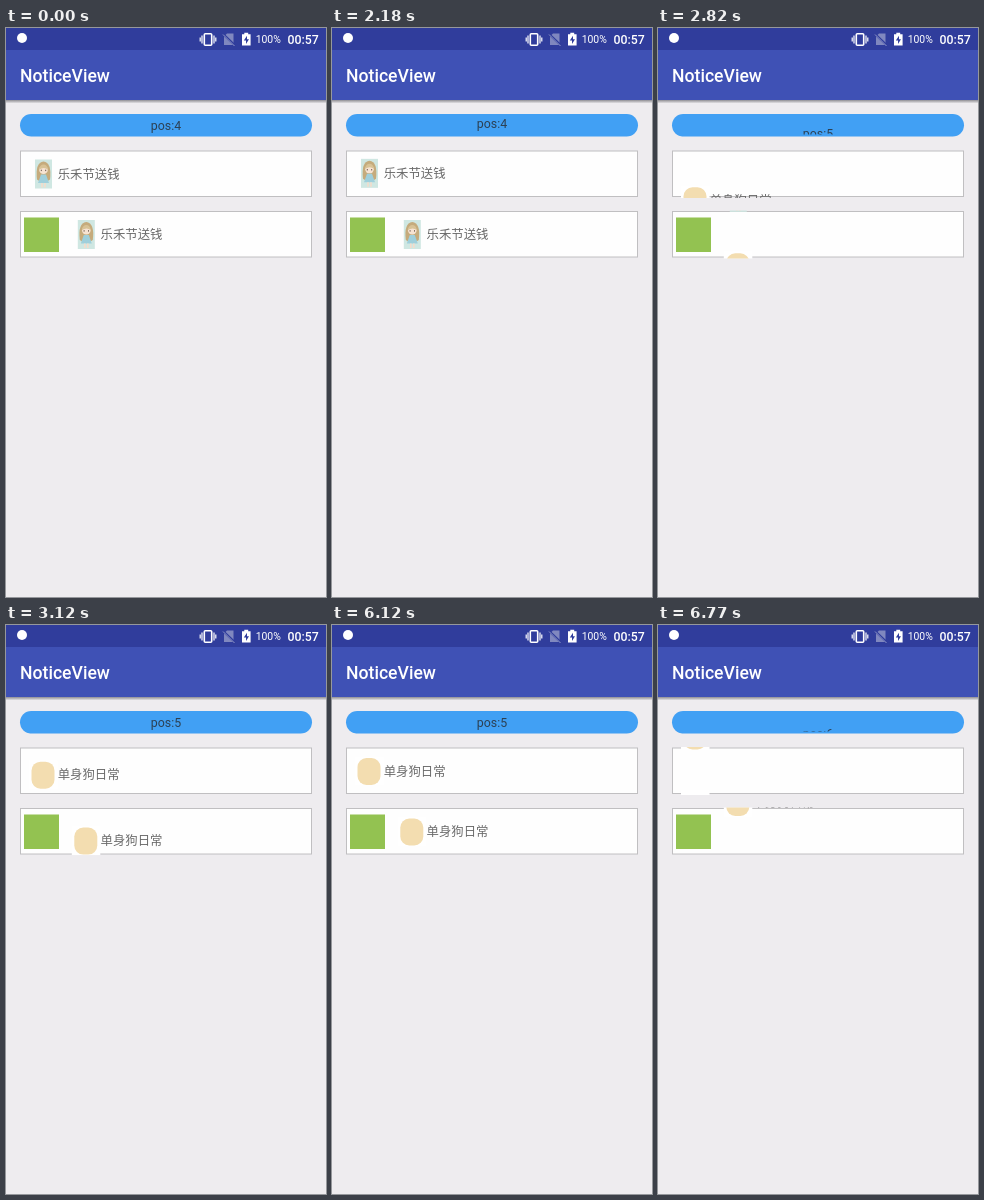
Write an HTML page that moves like this. It is 320 px wide and 569 px high and loops after 6.83 s.

```html
<!DOCTYPE html>
<html lang="zh">
<head>
<meta charset="utf-8">
<title>NoticeView</title>
<style>
html, body { margin: 0; width: 100%; height: 100%; overflow: hidden; background: #eeecef; }
svg { display: block; width: 100%; height: 100%; }
text { font-family: Roboto, sans-serif; }
.medium { font-weight: 500; }
.pos { font-size: 12.4px; fill: #2c4054; text-anchor: middle; }
.line { font-family: "Noto Sans CJK SC", "Noto Sans CJK", sans-serif; font-size: 12.4px; fill: #6a6a6a; }
</style>
</head>
<body>
<svg viewBox="0 0 320 569">
  <defs>
    <linearGradient id="shade" x2="0" y2="1">
      <stop stop-color="#8f8e93"/>
      <stop offset="1" stop-color="#eeecef"/>
    </linearGradient>
    <clipPath id="clip0"><rect x="14" y="87" width="292" height="19.5"/></clipPath>
    <clipPath id="clip1"><rect x="14" y="122" width="292" height="48"/></clipPath>
    <clipPath id="clip2"><rect x="14" y="182.5" width="292" height="48"/></clipPath>
    <!-- Pictures and captions are placed around the row's middle line -->
    <g id="row0">
      <g transform="translate(29 -14.5)">
        <rect width="17" height="29" fill="#cfe7e2"/>
        <path d="M2 20Q0 3 8.5 2Q17 3 15 20L12 22H5Z" fill="#c5ab7c"/>
        <ellipse cx="8.5" cy="10.5" rx="4.3" ry="4" fill="#f7e3d2"/>
        <path d="M4 10Q5 5 8.5 5Q12 5 13 10Q9 7 4 10Z" fill="#d8c295"/>
        <path d="M6.3 10.2v1.4M10.7 10.2v1.4" stroke="#6b574c"/>
        <path d="M6 15H11L14 23.5H3Z" fill="#9fcfdb"/>
        <path d="M7 23.5V28M10 23.5V28" stroke="#f3dccb" stroke-width="1.6"/>
      </g>
      <text class="line" x="51.7" y="4.7">乐禾节送钱</text>
    </g>
    <g id="row1">
      <rect x="23" y="-14.5" width="28.5" height="29" fill="#fff"/>
      <rect x="25.5" y="-13" width="23" height="27" rx="9" fill="#f3ddb0"/>
      <text class="line" x="51.7" y="4.7">单身狗日常</text>
    </g>
    <g id="row2">
      <rect x="23" y="-14.5" width="28.5" height="29" fill="#fff"/>
    </g>
  </defs>

  <rect width="320" height="569" fill="#eeecef"/>
  <rect y="72" width="320" height="3.5" fill="url(#shade)"/>
  <rect width="320" height="72" fill="#3f51b5"/>
  <rect width="320" height="22" fill="#303d9c"/>
  <text class="medium" x="14" y="54" font-size="17.6" fill="#fff">NoticeView</text>

  <g fill="#fff">
    <circle cx="16" cy="10" r="5"/>
    <rect x="198.3" y="5.8" width="7.4" height="11.4" rx="1" fill="none" stroke="#fff" stroke-width="1.6"/>
    <path d="M196 7.5v8M208 7.5v8M194.2 9.5v4M209.8 9.5v4" stroke="#fff" stroke-width="1.2"/>
    <path d="M221 5.5H227.5V17H218V8.5Z" fill="#8088bf"/>
    <path d="M217 6L229 17.5" stroke="#303d9c" stroke-width="2.4"/>
    <path d="M217 6.5L228.5 18" stroke="#8f96c8"/>
    <path d="M236 6.2H238.3V4.8H242.2V6.2H244.6V17.5H236Z"/>
    <path d="M241 7.8L237.8 12.4H240V16L243 11.2H241Z" fill="#303d9c"/>
    <text x="249.7" y="15.2" font-size="10.4">100%</text>
    <text class="medium" x="281.6" y="15.8" font-size="12.3">00:57</text>
  </g>

  <rect x="14" y="86" width="292" height="22.5" rx="11.25" fill="#41a0f4"/>
  <g fill="#fefefe" stroke="#c0bfc1">
    <rect x="14.5" y="123" width="291" height="45.5"/>
    <rect x="14.5" y="183.5" width="291" height="45.5"/>
  </g>
  <rect x="18" y="189.5" width="35" height="34.5" fill="#93c251"/>

  <g clip-path="url(#clip0)" id="view0"></g>
  <g clip-path="url(#clip1)" id="view1"></g>
  <g clip-path="url(#clip2)" id="view2"></g>
</svg>
<script>
const LOOP = 6830;
const STARTS = [2000, 6055];
const OUT_TIME = 880, IN_TIME = 610;

// Resting place, travel, and delays of the leaving and arriving item
const views = [
  { x: 0, y: 102.2, travel: 22, out: 0, in: 415 },
  { x: 0, y: 146, travel: 46, out: 114, in: 560 },
  { x: 42.8, y: 206.5, travel: 46, out: 195, in: 632 }
];

const clamp = v => Math.max(0, Math.min(1, v));
const ease = u => (1 - Math.cos(Math.PI * u)) / 2;

function add(parent, name, attrs, text = '') {
  const el = document.createElementNS('http://www.w3.org/2000/svg', name);
  for (const key in attrs) el.setAttribute(key, attrs[key]);
  el.textContent = text;
  return parent.appendChild(el);
}

views.forEach((view, n) => {
  const parent = document.getElementById('view' + n);
  view.items = [0, 1, 2].map(i => n
    ? add(parent, 'use', { href: '#row' + i })
    : add(parent, 'text', { class: 'pos', x: 160 }, 'pos:' + (4 + i)));
});

function offset(view, i, t) {
  const enter = i ? clamp((t - STARTS[i - 1] - view.in) / IN_TIME) : 1;
  const leave = i < 2 ? ease(clamp((t - STARTS[i] - view.out) / OUT_TIME)) : 0;
  return 1 - enter - leave;
}

function draw(t) {
  for (const view of views) {
    view.items.forEach((el, i) => {
      const d = offset(view, i, t);
      el.setAttribute('visibility', Math.abs(d) < 1 ? 'visible' : 'hidden');
      el.setAttribute('transform', `translate(${view.x} ${view.y + d * view.travel})`);
    });
  }
}

const begin = performance.now();
function tick() {
  draw((performance.now() - begin) % LOOP);
  requestAnimationFrame(tick);
}
tick();
</script>
</body>
</html>
```
